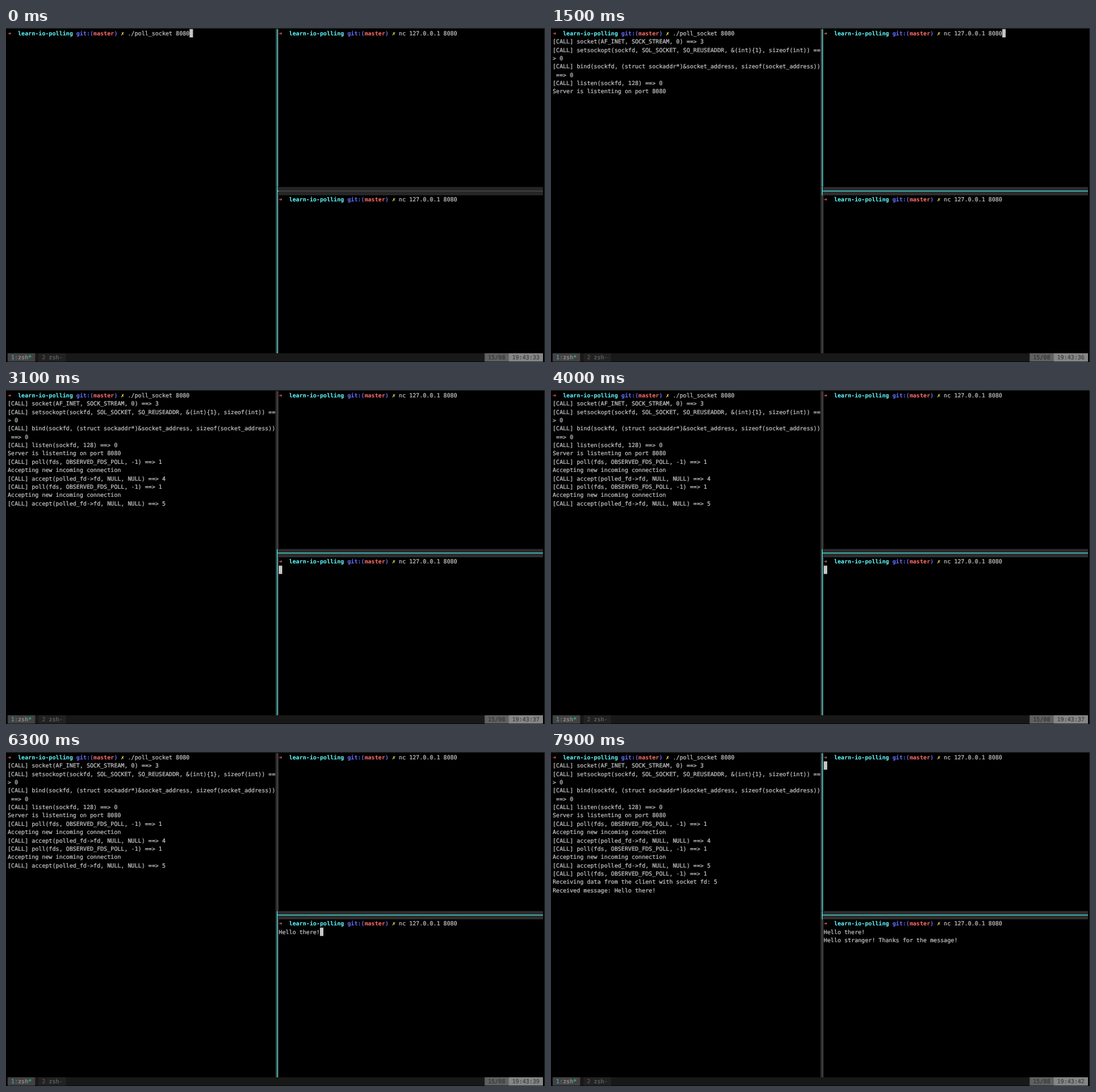
Animation of 800 by 497 pixels, one loop 8000 ms. Source, as an HTML page with a canvas:

```html
<!DOCTYPE html>
<html lang="en">
<head>
<meta charset="utf-8">
<title>Polling server in a split terminal</title>
<style>
  html, body { margin: 0; width: 100%; height: 100%; overflow: hidden; background: #000; }
  canvas { display: block; width: 800px; height: 497px; }
</style>
</head>
<body>
<canvas id="screen" width="800" height="497"></canvas>
<script>
const ctx = document.getElementById('screen').getContext('2d');
const LOOP = 8000;
const CELL_W = 5.093, CELL_H = 12.37, LEFT = 2.5, TOP = 1.6;
const SPLIT_COL = 78, RIGHT_COL = 79, SPLIT_ROW = 19, LOW_ROW = 20, COLS = 156, STATUS_ROW = 39;
const FONT = '8.46px "DejaVu Sans Mono", "Liberation Mono", monospace';

const FG = '#c7c7c7', RED = '#ff6e67', CYAN = '#60fdff', BLUE = '#6871ff', YELLOW = '#fffc67';
const BORDER = '#4a4a4a', BORDER_BG = '#262626', ACTIVE = '#45dede', ACTIVE_BG = '#2d2d2d';
const LINE = 1.2;

// Server output: [time, first row, lines]
const LOG = [
  [100, 1, [
    '[CALL] socket(AF_INET, SOCK_STREAM, 0) ==> 3',
    '[CALL] setsockopt(sockfd, SOL_SOCKET, SO_REUSEADDR, &(int){1}, sizeof(int)) ==',
    '> 0',
    '[CALL] bind(sockfd, (struct sockaddr*)&socket_address, sizeof(socket_address))',
    ' ==> 0',
    '[CALL] listen(sockfd, 128) ==> 0',
    'Server is listenting on port 8080']],
  [1800, 8, accepted(4)],
  [2900, 11, accepted(5)],
  [6600, 14, [
    '[CALL] poll(fds, OBSERVED_FDS_POLL, -1) ==> 1',
    'Receiving data from the client with socket fd: 5',
    'Received message: Hello there!']]
];

const MESSAGE = 'Hello there!';
const KEYS = [4600, 4700, 4700, 4800, 4900, 5100, 5300, 5500, 5600, 5800, 5900, 6200];
const TICKS = [300, 600, 1500, 2400, 5000, 5400, 7200, 7400, 7700];
const FOCUS = [[0, 'left'], [1500, 'top'], [2400, 'bottom'], [7600, 'top']];

function accepted(fd) {
  return [
    '[CALL] poll(fds, OBSERVED_FDS_POLL, -1) ==> 1',
    'Accepting new incoming connection',
    `[CALL] accept(polled_fd->fd, NULL, NULL) ==> ${fd}`];
}

const px = col => LEFT + col * CELL_W;
const py = row => TOP + row * CELL_H;
const passed = (times, t) => times.filter(at => t >= at).length;

function box(col, row, cols, rows, color) {
  ctx.fillStyle = color;
  ctx.fillRect(px(col), py(row), cols * CELL_W, rows * CELL_H);
}

// Each glyph sits on the terminal grid; a hairline stroke thickens plain text.
function text(col, row, str, color = FG, bold = false) {
  ctx.font = (bold ? 'bold ' : '') + FONT;
  ctx.fillStyle = ctx.strokeStyle = color;
  const y = Math.round(py(row) + 9.3);
  [...str].forEach((ch, i) => {
    if (ch === ' ') return;
    ctx.fillText(ch, px(col + i), y);
    if (!bold) ctx.strokeText(ch, px(col + i), y);
  });
  return col + str.length;
}

function prompt(col, row, command) {
  text(col, row, '➜', RED, true);
  col = text(col + 3, row, 'learn-io-polling ', CYAN, true);
  col = text(col, row, 'git:(', BLUE, true);
  col = text(col, row, 'master', RED, true);
  col = text(col, row, ') ', BLUE, true);
  col = text(col, row, '✗ ', YELLOW, true);
  text(col, row, command);
}

const lineX = Math.floor(px(SPLIT_COL + 0.5));
const lineY = Math.floor(py(SPLIT_ROW + 0.5));

function vertical(from, to, active) {
  box(SPLIT_COL, from, 1, to - from, active ? ACTIVE_BG : BORDER_BG);
  ctx.fillStyle = active ? ACTIVE : BORDER;
  ctx.fillRect(lineX, py(from), LINE, (to - from) * CELL_H);
}

function borders(focus) {
  const across = focus !== 'left';
  box(RIGHT_COL, SPLIT_ROW, COLS - RIGHT_COL, 1, across ? ACTIVE_BG : BORDER_BG);
  vertical(0, SPLIT_ROW, focus !== 'bottom');
  vertical(LOW_ROW, STATUS_ROW, focus !== 'top');
  vertical(SPLIT_ROW, LOW_ROW, true);
  ctx.fillStyle = across ? ACTIVE : BORDER;
  ctx.fillRect(px(RIGHT_COL), lineY, px(COLS) - px(RIGHT_COL), LINE);
  ctx.fillStyle = ACTIVE;
  ctx.fillRect(lineX, lineY, px(RIGHT_COL) - lineX, LINE);
}

function status(t) {
  const row = STATUS_ROW;
  box(0, row, COLS, 1, '#181818');
  box(0, row, 8, 1, '#424242');
  text(1, row, '1', '#52a0b4');
  text(2, row, ':', '#808080');
  text(3, row, 'zsh', '#9a9a9a');
  text(6, row, '*', '#25b99f');
  box(9, row, 8, 1, '#222');
  text(10, row, '2', '#645454');
  text(12, row, 'zsh', '#686868');
  text(15, row, '-', '#585858');
  box(139, row, 7, 1, '#606060');
  text(140, row, '15/08', '#363636');
  box(146, row, 10, 1, '#868686');
  text(147, row, '19:43:' + (33 + passed(TICKS, t)), '#404040');
}

function cursorAt(t, focus, typed) {
  if (focus === 'left') return t < 100 ? [53, 0] : [0, 8];
  if (focus === 'top') return t < 1800 ? [RIGHT_COL + 52, 0] : [RIGHT_COL, 1];
  if (t < 2900) return [RIGHT_COL + 52, LOW_ROW];
  return t < 6600 ? [RIGHT_COL + typed, LOW_ROW + 1] : [RIGHT_COL, LOW_ROW + 3];
}

function windowEdge() {
  ctx.fillStyle = '#262626';
  ctx.fillRect(0, 0, 800, 1);
  ctx.fillRect(799, 0, 1, 497);
}

function draw(t) {
  const focus = FOCUS.filter(([at]) => t >= at).pop()[1];
  const typed = passed(KEYS, t);
  ctx.fillStyle = '#000';
  ctx.fillRect(0, 0, 800, 497);
  borders(focus);
  prompt(0, 0, './poll_socket 8080');
  prompt(RIGHT_COL, 0, 'nc 127.0.0.1 8080');
  prompt(RIGHT_COL, LOW_ROW, 'nc 127.0.0.1 8080');
  for (const [at, row, lines] of LOG) {
    if (t >= at) lines.forEach((line, i) => text(0, row + i, line));
  }
  text(RIGHT_COL, LOW_ROW + 1, MESSAGE.slice(0, typed));
  if (t >= 6600) text(RIGHT_COL, LOW_ROW + 2, 'Hello stranger! Thanks for the message!');
  status(t);
  box(...cursorAt(t, focus, typed), 1, 1, FG);
  windowEdge();
}

ctx.textBaseline = 'alphabetic';
ctx.textRendering = 'geometricPrecision';
ctx.lineWidth = 0.2;
ctx.lineJoin = 'round';
const start = performance.now();
function frame() {
  draw((performance.now() - start) % LOOP);
  requestAnimationFrame(frame);
}
frame();
</script>
</body>
</html>
```
